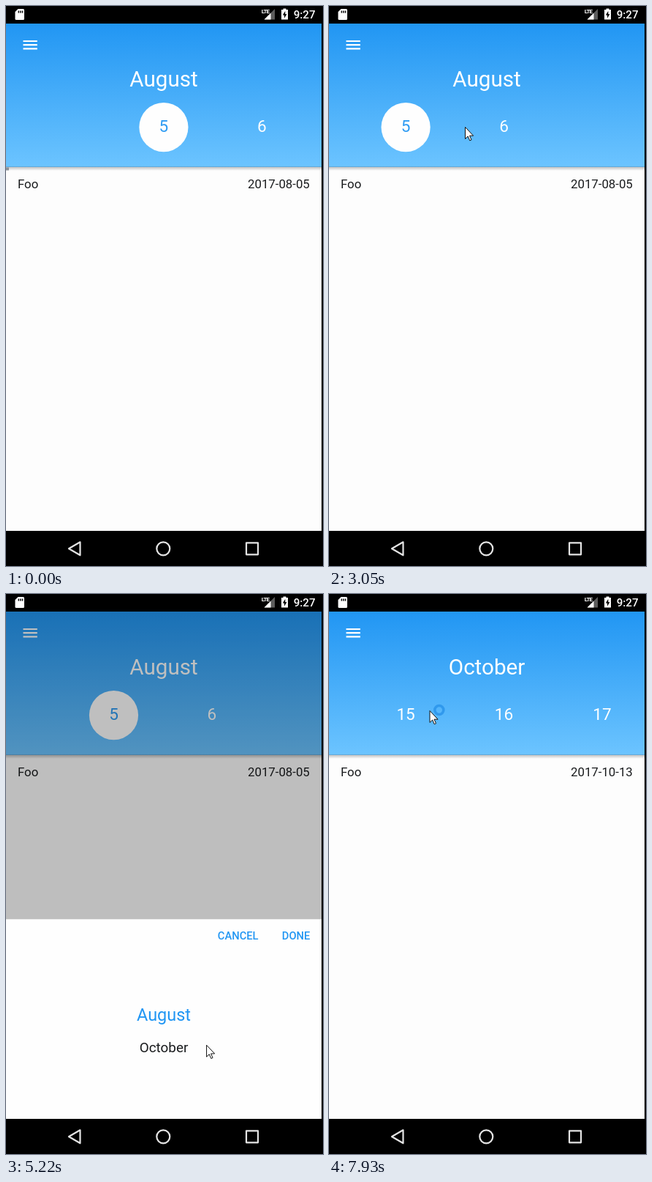
Recreate the animation shown at these times as an HTML page. Size 434 by 765 pixels, loop 7990 ms.

```html
<!DOCTYPE html>
<html lang="en">
<head>
<meta charset="utf-8">
<title>Month picker</title>
<style>
  html, body { margin: 0; width: 434px; height: 765px; overflow: hidden; background: #000; }
  svg { display: block; }
  text { font-family: Roboto, sans-serif; font-size: 16.8px; fill: #1a1c1e; }
  .mid { text-anchor: middle; }
  .end { text-anchor: end; }
  #month { font-size: 29.6px; fill: #fff; }
  .day text { font-size: 22.6px; fill: #fff; }
  .day.on text { fill: #2d9bf3; }
  .day circle { fill: none; }
  .day.on circle { fill: #fefefe; }
  .btn { font-size: 14.7px; font-weight: 500; fill: #2196f3; }
  .clock { font-size: 15.1px; font-weight: 500; fill: #fff; }
  .lte { font-size: 8px; font-weight: 700; letter-spacing: -.9px; fill: #fff; }
  .item { font-size: 18.9px; }
  .item.on { font-size: 23.5px; fill: #2196f3; }
  .nav { fill: none; stroke: #e4e4e4; stroke-width: 2.2; stroke-linejoin: round; }
</style>
</head>
<body>
<svg width="434" height="765" viewBox="0 0 434 765">
  <defs>
    <linearGradient id="sky" x2="0" y2="1">
      <stop stop-color="#2196f3"/><stop offset="1" stop-color="#6cc4ff"/>
    </linearGradient>
    <linearGradient id="shade" x2="0" y2="1">
      <stop stop-color="#000" stop-opacity=".26"/>
      <stop offset="1" stop-color="#000" stop-opacity="0"/>
    </linearGradient>
    <clipPath id="page"><path d="M0 24H432V717H0Z"/></clipPath>
  </defs>

  <g clip-path="url(#page)">
    <path d="M0 24H432V717H0Z" fill="#fdfdfd"/>
    <path d="M0 24H432V220H0Z" fill="url(#sky)"/>
    <path d="M0 219.5H432V225H0Z" fill="url(#shade)"/>
    <path d="M23.5 46.900h19.300v2.100h-19.300zM23.500 52.100h19.300v2.100h-19.300zM23.500 57.300h19.300v2.100h-19.300z" fill="#fff"/>
    <text id="month" class="mid" x="216" y="110"></text>
    <g id="strip"></g>
    <text x="16" y="248.600">Foo</text>
    <text id="date" class="end" x="415.800" y="248.600"></text>
    <path id="speck" d="M0 220.500h4v4h-4z" fill="#8a929a"/>
    <path id="dim" d="M0 24H432V717H0Z"/>
    <g id="sheet">
      <path d="M0 0H432V300H0Z" fill="#fefefe"/>
      <text class="btn end" x="345.500" y="28.200">CANCEL</text>
      <text class="btn end" x="416.300" y="28.200">DONE</text>
      <text class="item mid" x="216">August</text>
      <text class="item mid" x="216">October</text>
    </g>
  </g>

  <g fill="#fff">
    <path d="M16.500 4H23.500Q25 4 25 5.500V17.500Q25 19 23.500 19H14Q12.500 19 12.500 17.500V8Z"/>
    <path d="M16.600 6.500h1.500v3h-1.500zM19.200 6.500h1.500v3h-1.500zM21.800 6.500h1.500v3h-1.500z" fill="#000"/>
    <path d="M368 4V18.500H353.500Z" fill="#5c5c5c"/>
    <path d="M362.500 9.500V18.500H353.500Z"/>
    <path d="M379.500 5V3.500H383.500V5H386V18.500H377V5Z"/>
    <path d="M382.300 6.800L378.800 12.400H381V16.800L384.400 11H382.300Z" fill="#000"/>
  </g>
  <text class="lte" x="349.800" y="10.200">LTE</text>
  <text class="clock end" x="423.500" y="17.300">9:27</text>

  <g class="nav">
    <path d="M86 741.300L101.500 732.300V750.300Z"/>
    <circle cx="215.300" cy="741.300" r="9"/>
    <path d="M329 733.300H345V749.300H329Z"/>
  </g>

  <g id="cursor">
    <circle id="busy" cx="13.300" cy="-.5" r="6" fill="none" stroke="#2a94ea" stroke-width="3.600" opacity=".85"/>
    <path d="M.5 .5V16.500L4.200 13L6.700 18.800L9 17.800L6.500 12.200H11.600Z" fill="#fff" stroke="#111"/>
  </g>
</svg>
<script>
  const LOOP = 7990, START = 290, STEP = 77, LAST = 99;
  const GAP = 134.4, ROW = 44.6;
  const HOME = 215.9, REST = 147.5, PULLED = 105.1;
  const CLOSED = 717, OPEN = 444.3;
  const NS = 'http://www.w3.org/2000/svg';
  const $ = id => document.getElementById(id);

  const smooth = t => t * t * (3 - 2 * t);
  const easeOut = t => 1 - (1 - t) ** 3;
  const mix = (a, b, f) => a + (b - a) * f;
  const ramp = (k, from, to, ease = smooth) =>
    ease(Math.min(1, Math.max(0, (k - from) / (to - from))));

  // Chains moves [from, to, target], each starting where the last one ended.
  const chain = (k, start, ...moves) =>
    moves.reduce((v, [from, to, target]) => mix(v, target, ramp(k, from, to)), start);

  // 0 when shut, 1 when open.
  const opened = (k, time) =>
    ramp(k, 50, 50 + time, easeOut) - ramp(k, 81, 81 + time, easeOut);

  const path = [
    [0, 6, 342, 186], [7, 15, 243, 174],    // pull left
    [22, 28, 403, 229], [31, 36, 186, 165], // right and left again
    [37, 41, 226, 152], [41, 45, 224, 97],  // tap the month
    [54, 61, 272, 630], [62, 68, 280, 575], // turn the wheel
    [68, 78, 396, 469], [82, 87, 307, 186], // confirm and return
    [92, 99, 137.5, 159]
  ];
  const pointer = k => [
    chain(k, 355, ...path.map(([a, b, x]) => [a, b, x])),
    chain(k, 595, ...path.map(([a, b, , y]) => [a, b, y]))
  ];
  const stripX = k => chain(k, HOME,
    [6, 12, PULLED], [15, 18, REST], [22, 26, HOME],
    [31, 36, PULLED], [37, 40, REST], [92, 98, PULLED - 2 * GAP]);

  function add(parent, tag, attrs) {
    const el = document.createElementNS(NS, tag);
    for (const key in attrs) el.setAttribute(key, attrs[key]);
    return parent.appendChild(el);
  }

  const move = (el, x, y) => el.setAttribute('transform', `translate(${x} ${y})`);
  const show = (el, on) => { el.style.visibility = on ? 'visible' : 'hidden'; };

  const days = Array.from({ length: 5 }, (_, i) => {
    const g = add($('strip'), 'g', { class: i ? 'day' : 'day on' });
    move(g, i * GAP, 0);
    add(g, 'circle', { cy: 165.6, r: 33.6 });
    return { g, label: add(g, 'text', { class: 'mid', y: 172.3 }) };
  });
  const items = [...document.querySelectorAll('.item')];

  function setMonth(october) {
    const first = october ? 13 : 5;
    $('month').textContent = october ? 'October' : 'August';
    $('date').textContent = october ? '2017-10-13' : '2017-08-05';
    days.forEach(({ g, label }, i) => {
      label.textContent = first + i;
      show(g, october || i < 2);
    });
  }

  function render(ms) {
    // The screen refreshes in even steps.
    const k = Math.min(LAST, Math.floor((ms - START) / STEP + .2));
    setMonth(k >= 83);
    move($('strip'), stripX(k), 0);

    move($('sheet'), 0, mix(CLOSED, OPEN, opened(k, 4.35)));
    $('dim').style.opacity = .25 * opened(k, 3.5);
    const turn = ROW * ramp(k, 61, 68);
    items.forEach((el, i) => {
      const on = (turn > ROW / 2) === (i === 1);
      el.classList.toggle('on', on);
      el.setAttribute('y', 148.3 + i * ROW - turn + (on ? 8.3 : 6.7));
    });

    show($('speck'), k < 22);
    show($('cursor'), k >= 0);
    show($('busy'), k >= 84);
    move($('cursor'), ...pointer(k));
  }

  const begin = performance.now();
  function tick() {
    render((performance.now() - begin) % LOOP);
    requestAnimationFrame(tick);
  }
  tick();
</script>
</body>
</html>
```
